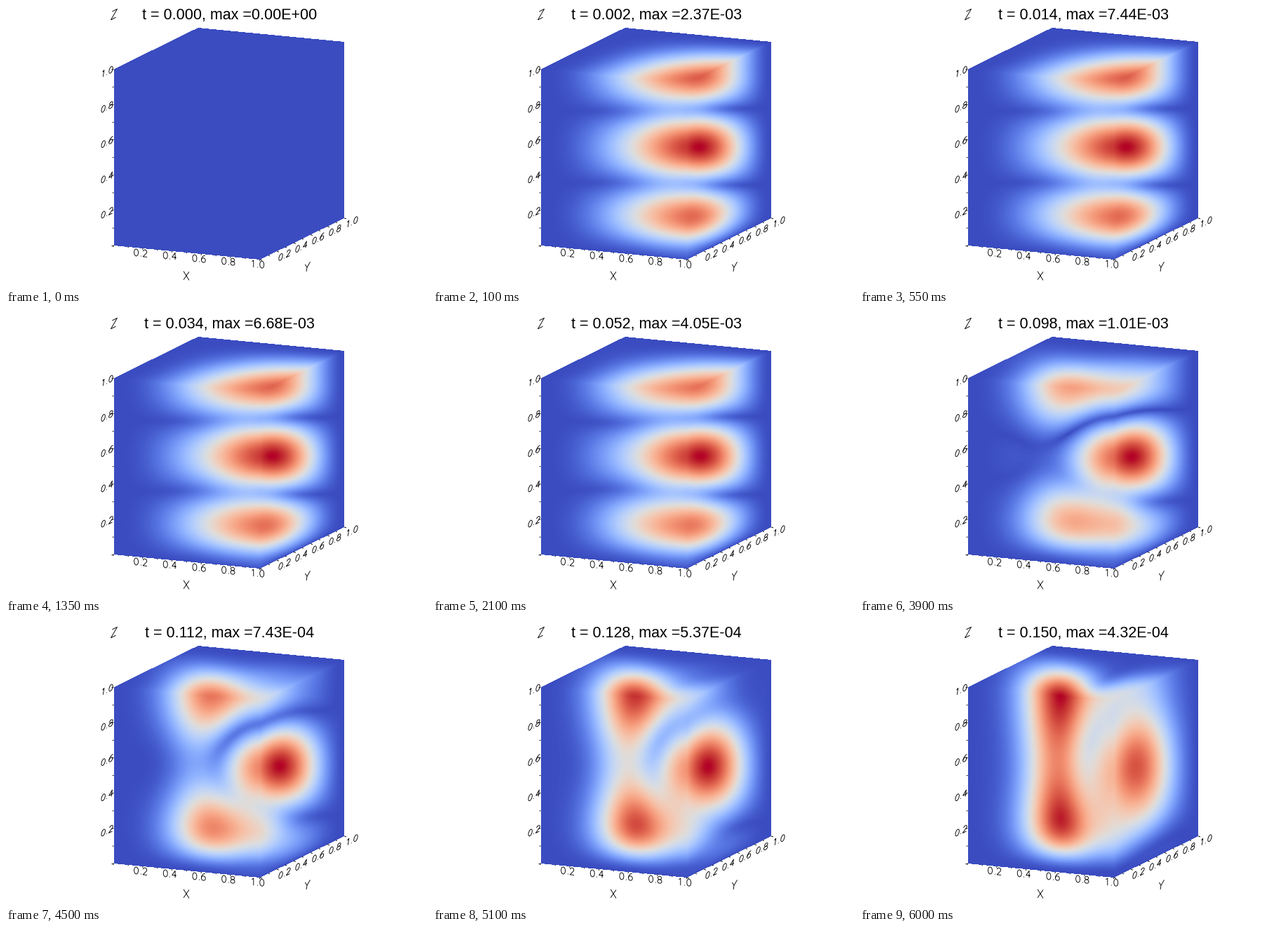
These frames come from a looping animation (600x400 px, 6.05 s). A matplotlib script:

```python
import numpy as np
import matplotlib.pyplot as plt
from matplotlib.animation import FuncAnimation
from matplotlib.collections import LineCollection

W, H, DPI = 600, 400, 100
FRAMES, STEP_MS = 121, 50
DT = 0.00125

# Oblique projection: lower front-left corner and the three edge vectors
ORIGIN = np.array([153.6, 341.0])
EX = np.array([208.4, 20.0])
EY = np.array([120.0, -59.0])
EZ = np.array([0.0, -251.0])

# Times and peak values of the decaying field
KEY_T = np.array([0.01375, 0.0525, 0.075, 0.0975, 0.1275, 0.15])
KEY_MAX = np.array([7.44e-3, 4.05e-3, 1.99e-3, 1.01e-3, 5.37e-4, 4.32e-4])


def project(x, y, z):
    return ORIGIN + x * EX + y * EY + z * EZ


def surface():
    """Cube and stage coordinates of each visible pixel, and their mask."""
    py, px = np.mgrid[0:H, 0:W] + 0.5
    a, b = px - ORIGIN[0], py - ORIGIN[1] - EZ[1]
    det = EX[0] * EY[1] - EY[0] * EX[1]
    one = np.ones_like(px)
    x = a / EX[0]
    y = (a - EX[0]) / EY[0]
    faces = [
        (x, 0 * one, 1 + (EX[1] * x - b) / 251),
        (one, y, 1 + (EX[1] + EY[1] * y - b) / 251),
        ((EY[1] * a - EY[0] * b) / det, (EX[0] * b - EX[1] * a) / det, one),
    ]
    pos = np.zeros((3, H, W))
    mask = np.zeros((H, W), bool)
    for face in faces:
        face = np.array(face)
        inside = ((face >= 0) & (face <= 1)).all(axis=0) & ~mask
        pos[:, inside] = face[:, inside]
        mask |= inside
    return pos[:, mask], px[mask], py[mask], mask


def bell(v, mid, width):
    return np.exp(-((v - mid) / width) ** 2)


(X, Y, Z), COL, ROW, MASK = surface()
COS_Y = np.cos(np.pi * Y / 2).clip(0)
RISE = (1 - np.exp(-(Z / 0.16) ** 1.9)) * (1.06 - 0.06 * Z)
TAPER = RISE ** 0.4
# The lobes stay level across the faces
PHASE = np.pi * (ROW.clip(97.5) - 200.5) / 103

# Fast mode with three lobes, slow modes on the front and right faces
FAST = (-np.sqrt(X) * np.sin(np.pi * X / 2) ** 2 * COS_Y ** 1.9
        * (1 + 0.6 * Y) * np.cos(PHASE) * TAPER)
FRONT = bell(COL, 285, 52) * COS_Y ** 2.2 * RISE
RIGHT = (bell(X, 1, 0.3) * bell(Y, 0.32, 0.4) * (1 - Y ** 8)
         * bell(ROW, 199, 200) * RISE)
CROSS = bell(X, 0.92, 0.33) * bell(Y, 0, 0.42)
CROSS_FAST = 0.33 * CROSS * np.sin(PHASE) * TAPER
CROSS_SLOW = 0.57 * CROSS * RISE


def field(t):
    """Vector magnitude on the cube, scaled to a peak of one."""
    if t == 0:
        return np.zeros_like(X)
    slow = 0.17 * np.exp(44 * (t - 0.075))
    p = FAST + slow * FRONT - (0.07 + 0.68 * slow) * RIGHT
    q = CROSS_FAST + slow * CROSS_SLOW
    mag = np.hypot(p, q)
    return mag / mag.max()


def peak(t):
    rate = np.log(KEY_MAX / KEY_T)
    return t * np.exp(np.interp(t, np.r_[0, KEY_T], np.r_[np.log(1.076), rate]))


def arc(cx, cy, rx, ry, start, end):
    a = np.radians(np.linspace(start, end, 20))
    return np.c_[cx + rx * np.cos(a), cy + ry * np.sin(a)]


# Stroke font: unit height, list of polylines per character
GLYPHS = {
    "0": [arc(0.33, 0.5, 0.3, 0.5, 0, 360)],
    "1": [[(0.15, 0.8), (0.38, 1), (0.38, 0)]],
    "2": [np.r_[arc(0.33, 0.72, 0.27, 0.28, 170, -40), [(0.05, 0), (0.64, 0)]]],
    "4": [[(0.65, 0.33), (0.03, 0.33), (0.47, 1), (0.47, 0)]],
    "6": [arc(0.33, 0.32, 0.29, 0.32, 0, 360), arc(0.58, 0.3, 0.54, 0.7, 180, 90)],
    "8": [arc(0.33, 0.76, 0.25, 0.24, 0, 360), arc(0.33, 0.27, 0.3, 0.27, 0, 360)],
    ".": [[(0.1, 0), (0.1, 0.1)]],
    "X": [[(0, 0), (0.66, 1)], [(0, 1), (0.66, 0)]],
    "Y": [[(0, 1), (0.33, 0.5), (0.66, 1)], [(0.33, 0.5), (0.33, 0)]],
    "Z": [[(0, 1), (0.66, 1), (0, 0), (0.66, 0)]],
}
FLAT = np.array([[0.995, 0.095], [0.0, -1.0]])
TILTED = np.array([[0.87, -0.43], [0.15, -0.95]])


def strokes(text, center, size, basis):
    parts, pen = [], 0.0
    for ch in text:
        parts += [np.array(line) + (pen, 0) for line in GLYPHS[ch]]
        pen += 0.4 if ch == "." else 0.85
    mid = np.array([(pen - 0.19) / 2, 0.5])
    return [np.array(center) + size * (part - mid) @ basis for part in parts]


def axes_lines():
    lines = []
    axes = [
        (lambda s: project(s, 0, 0), (-0.3, 0.6), (-3.5, 6.5), FLAT),
        (lambda s: project(1, s, 0), (1, 0.3), (11, 5.5), TILTED),
        (lambda s: project(0, 0, s), (-1, 0.2), (-9.5, 3.5), TILTED),
    ]
    for place, out, shift, basis in axes:
        for i in range(11):
            at = place(i / 10)
            major = i % 2 == 0
            lines.append([at, at + np.array(out) * (3 if major else 2)])
            if major and i:
                lines += strokes(f"{i / 10:.1f}", at + shift, 10, basis)
    lines += strokes("X", (257, 384), 12, FLAT)
    lines += strokes("Y", (429, 372), 12.5, TILTED)
    lines += strokes("Z", (154, 12), 12.5, TILTED)
    return lines


fig = plt.figure(figsize=(W / DPI, H / DPI), dpi=DPI, facecolor="white")
ax = fig.add_axes([0, 0, 1, 1])
cmap = plt.get_cmap("coolwarm")
canvas = np.ones((H, W, 3))
image = ax.imshow(canvas, extent=(0, W, H, 0), interpolation="nearest",
                  aspect="auto")
ax.add_collection(LineCollection(axes_lines(), colors="black", linewidths=0.65))
title = ax.text(318.5, 18.6, "", family="Liberation Sans", fontsize=15.5,
                ha="center", va="baseline", color="black")
ax.set_xlim(0, W)
ax.set_ylim(H, 0)
ax.axis("off")


def update(k):
    t = k * DT
    canvas[MASK] = cmap(field(t))[:, :3]
    image.set_data(canvas)
    title.set_text(f"t = {round(k * 1.25) / 1000:.3f}, max ={peak(t):.2E}")
    return image, title


anim = FuncAnimation(fig, update, frames=FRAMES, interval=STEP_MS,
                     repeat=True, repeat_delay=0, blit=False)
plt.show()
```
